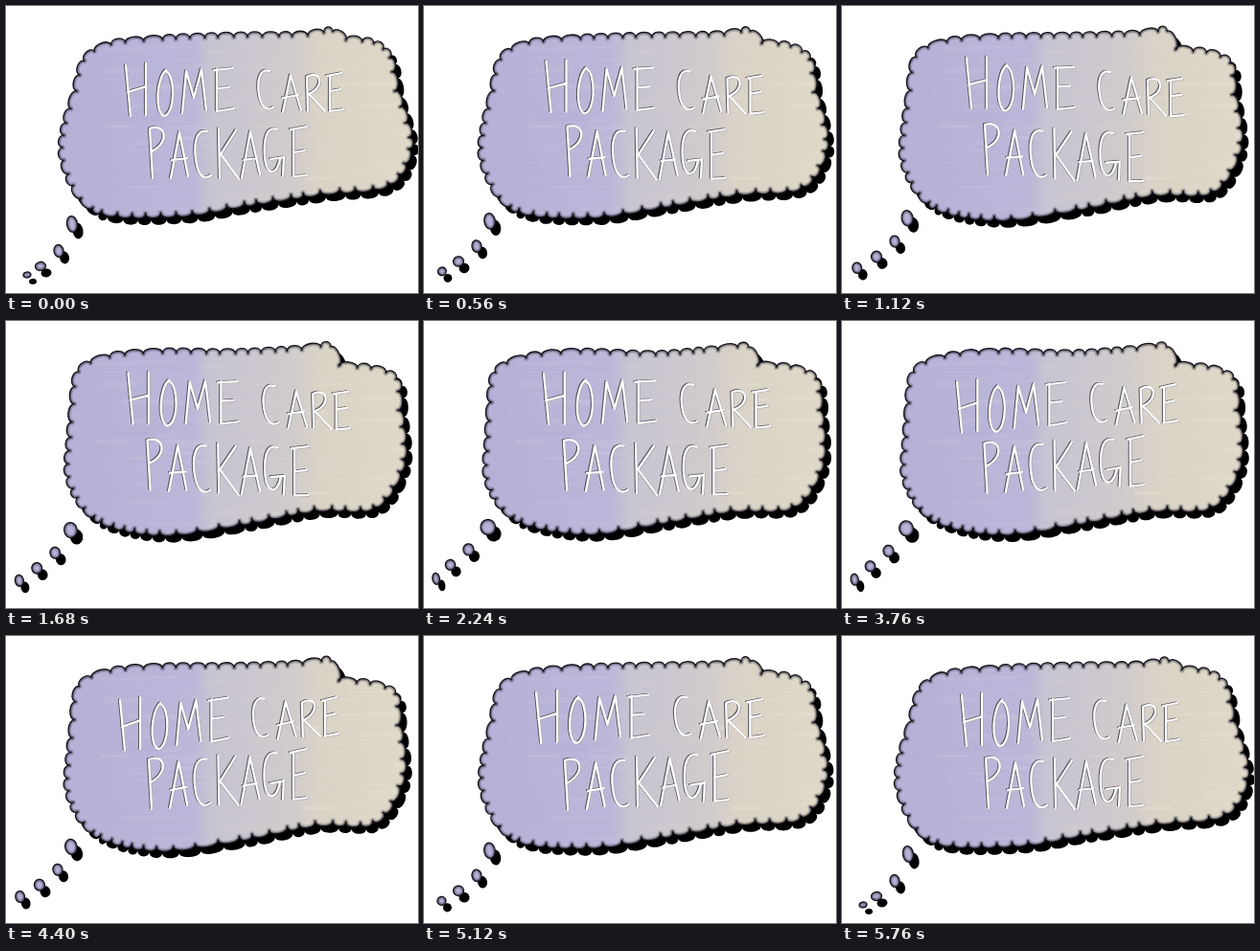
These frames come from a looping animation (430x300 px, 5840 ms). An HTML page with a canvas:

```html
<!DOCTYPE html>
<html lang="en">
<head>
<meta charset="utf-8">
<title>Home care package</title>
<style>
html, body { margin: 0; width: 100%; height: 100%; overflow: hidden; background: #fff; }
canvas { display: block; }
</style>
</head>
<body>
<canvas id="stage" width="430" height="300" role="img" aria-label="HOME CARE PACKAGE"></canvas>
<script>
const ctx = document.getElementById('stage').getContext('2d');
const STEP = 80, LOOP = 5840, TURN = 1240, HALF = 2880;

// Three poses of the bubble outline, clockwise x,y pairs.
const outlines = [
  [78,55, 105,37, 160,31, 235,28, 310,27, 341,22, 354,31, 385,35, 404,52, 409,85,
   420,118, 424,150, 401,188, 330,197, 250,209, 180,220, 90,215, 57,165, 58,125, 69,90],
  [73,50, 105,34, 160,29, 235,28, 305,26, 341,22, 348,43, 380,46, 409,58, 411,90,
   417,125, 413,158, 385,197, 325,198, 245,214, 158,225, 90,208, 62,165, 63,125, 67,90],
  [70,52, 100,36, 160,29, 242,34, 300,27, 340,24, 349,42, 385,44, 414,58, 418,90,
   420,125, 415,160, 387,195, 320,200, 245,211, 175,222, 95,208, 64,170, 64,125, 65,85]
];
// Tail dots: x, y, rx, ry
const tails = [
  [69,228,5.5,8.5, 55,256,5,6.5, 36,272,5.5,4.5, 22,281,4,3],
  [68,221,6,8, 55,245,5,6, 36,261,5.5,6, 15,273,5,6],
  [66,212,9,8, 41,235,6,6, 22,251,5,5, 11,267,3,6]
];
// Lettering drift: left dx, dy and right dx, dy for each row.
const driftTimes = [0, 1120, 2240, 3200, 4400, 5120, 5760];
const rows = [
  {
    x: 125, width: 226,
    path: new Path2D(`M125 62L130 115M146 60L146 114M127 90L146 84
      M167 67C157 75 155 112 165 115C177 113 177 70 166 68
      M184 112L188 68L196 96L204 66L209 109
      M220 66V110M217 67L237 65M220 86L233 85M220 110L238 107
      M275 68C264 64 262 80 264 92C266 106 272 110 279 106
      M289 111L297 72L308 109M289 96L305 93
      M315 110L314 74C328 66 334 84 316 92L333 110
      M338 73V110M335 73L350 70M338 89L349 87M338 110L352 108`),
    drift: [[0,0,0,0], [5,-8,5,6], [0,-7,9,2], [-4,-1,1,-2], [-6,5,-5,-6], [-8,-3,3,-4], [0,0,0,0]]
  },
  {
    x: 150, width: 164,
    path: new Path2D(`M153 180L150 128C166 122 172 142 152 152
      M172 180L181 132L190 178M173 161L189 159
      M210 131C198 128 196 145 198 160C200 178 207 182 214 177
      M222 128L223 180M240 130L224 155L243 181
      M246 180L255 131L265 176M248 161L262 159
      M283 129C270 124 269 145 270 158C272 178 282 178 286 160M276 160L290 158L289 178
      M300 129V178M297 129L314 126M300 153L312 151M300 178L314 177`),
    drift: [[0,0,0,0], [-1,-4,0,6], [-4,-3,3,4], [-2,-1,2,-4], [-1,1,0,-8], [-3,2,4,-6], [0,0,0,0]]
  }
];

const mix = (a, b, p) => a.map((v, i) => v + (b[i] - v) * p);

function seeded(seed) {
  return () => (seed = seed * 16807 % 2147483647) / 2147483647;
}

function spline(a, b, c, d, p) {
  return b + p / 2 * (c - a + p * (2 * a - 5 * b + 4 * c - d + p * (3 * (b - c) + d - a)));
}

const count = outlines[0].length / 2;
const scallops = Array.from({ length: count }, (_, i) => {
  const o = outlines[0], j = (i + 1) % count;
  return Math.max(1, Math.round(Math.hypot(o[2*j] - o[2*i], o[2*j+1] - o[2*i+1]) / 16));
});

function bubblePath(outline) {
  const random = seeded(41), at = (i, axis) => outline[2 * ((i + count) % count) + axis];
  const points = [];
  scallops.forEach((n, i) => {
    for (let k = 0; k < n; k++) {
      const p = (k + random() * 0.25) / n;
      points.push([0, 1].map(axis =>
        spline(at(i - 1, axis), at(i, axis), at(i + 1, axis), at(i + 2, axis), p)));
    }
  });
  const total = points.length;
  const normal = (a, b) => {
    const dx = b[0] - a[0], dy = b[1] - a[1], d = Math.hypot(dx, dy) || 1;
    return [dy / d, -dx / d];
  };
  const cusps = points.map((pt, i) => {
    const n = normal(points[(i + total - 1) % total], points[(i + 1) % total]);
    return [pt[0] - n[0] * 4.5, pt[1] - n[1] * 4.5];
  });
  const path = new Path2D();
  path.moveTo(...cusps[0]);
  cusps.forEach((a, i) => {
    const b = cusps[(i + 1) % total], n = normal(a, b), nx = n[0] * 7, ny = n[1] * 7;
    path.bezierCurveTo(a[0] + nx, a[1] + ny, b[0] + nx, b[1] + ny, ...b);
  });
  path.closePath();
  return path;
}

const paint = ctx.createLinearGradient(55, 0, 425, 0);
[[0, '#b5b1d7'], [0.38, '#bbb7d9'], [0.43, '#c8c4d1'], [0.66, '#d0cbcc'], [0.73, '#d9d3c7'], [1, '#dfd9c8']]
  .forEach(stop => paint.addColorStop(...stop));

function brushStrokes(shift) {
  const random = seeded(977);
  const tones = ['#aaa6d2', '#c9c5d9', '#d6d0c9', '#e6e0cd'];
  for (let i = 0; i < 150; i++) {
    const x = 50 + random() * 370, y = 30 + random() * 185;
    const tone = Math.min(3, Math.floor((x - 50) / 100 + random() * 0.7));
    ctx.globalAlpha = 0.12 + random() * 0.2;
    ctx.fillStyle = tones[tone];
    ctx.fillRect(x + shift, y, 15 + random() * 50, 1 + random() * 3);
  }
  ctx.globalAlpha = 1;
}

function fillShadow(path) {
  ctx.save();
  ctx.translate(6, 7);
  ctx.fillStyle = '#000';
  ctx.fill(path);
  ctx.restore();
}

function edge(path, width, alpha) {
  ctx.lineWidth = width;
  ctx.strokeStyle = `rgba(20,18,28,${alpha})`;
  ctx.stroke(path);
}

function drawShape(path, shift) {
  fillShadow(path);
  ctx.fillStyle = paint;
  ctx.fill(path);
  ctx.save();
  ctx.clip(path);
  if (shift !== undefined) brushStrokes(shift);
  edge(path, 6, 0.18);
  edge(path, 3.5, 0.35);
  ctx.restore();
  edge(path, 1.3, 1);
}

function drawRow({ x, width, path, drift }, time) {
  const last = driftTimes.length - 1;
  let k = 0;
  while (k < last - 1 && time > driftTimes[k + 1]) k++;
  const p = Math.min(1, (time - driftTimes[k]) / (driftTimes[k + 1] - driftTimes[k]));
  const [lx, ly, rx, ry] = mix(drift[k], drift[k + 1], p);
  const sx = (rx - lx) / width, sy = (ry - ly) / width;
  ctx.save();
  ctx.transform(1 + sx, sy, 0, 1, lx - x * sx, ly - x * sy);
  [[-1.2, -0.7, 1.8, '#55525c'], [0.8, 0.6, 2, '#aaa6ad'], [0, 0, 2.2, '#fff']]
    .forEach(([dx, dy, weight, color]) => {
      ctx.save();
      ctx.translate(dx, dy);
      ctx.lineWidth = weight;
      ctx.strokeStyle = color;
      ctx.stroke(path);
      ctx.restore();
    });
  ctx.restore();
}

function draw(now) {
  const time = Math.floor(now % LOOP / STEP) * STEP;
  const phase = Math.min(time, 2 * HALF - time);
  const early = phase < TURN, from = early ? 0 : 1;
  const p = early ? phase / TURN : (phase - TURN) / (HALF - TURN);
  const outline = mix(outlines[from], outlines[from + 1], early ? p ** 1.5 : p);
  const dots = mix(tails[from], tails[from + 1], p);

  ctx.fillStyle = '#fff';
  ctx.fillRect(0, 0, 430, 300);
  ctx.lineCap = ctx.lineJoin = 'round';
  drawShape(bubblePath(outline), 8 * Math.sin(phase / 400));
  for (let i = 0; i < dots.length; i += 4) {
    const [x, y, rx, ry] = dots.slice(i, i + 4);
    const dot = new Path2D();
    dot.ellipse(x, y, rx, ry, -0.15, 0, 7);
    drawShape(dot);
  }
  rows.forEach(row => drawRow(row, time));
}

const start = performance.now();
function tick() {
  draw(performance.now() - start);
  requestAnimationFrame(tick);
}
tick();
</script>
</body>
</html>
```
